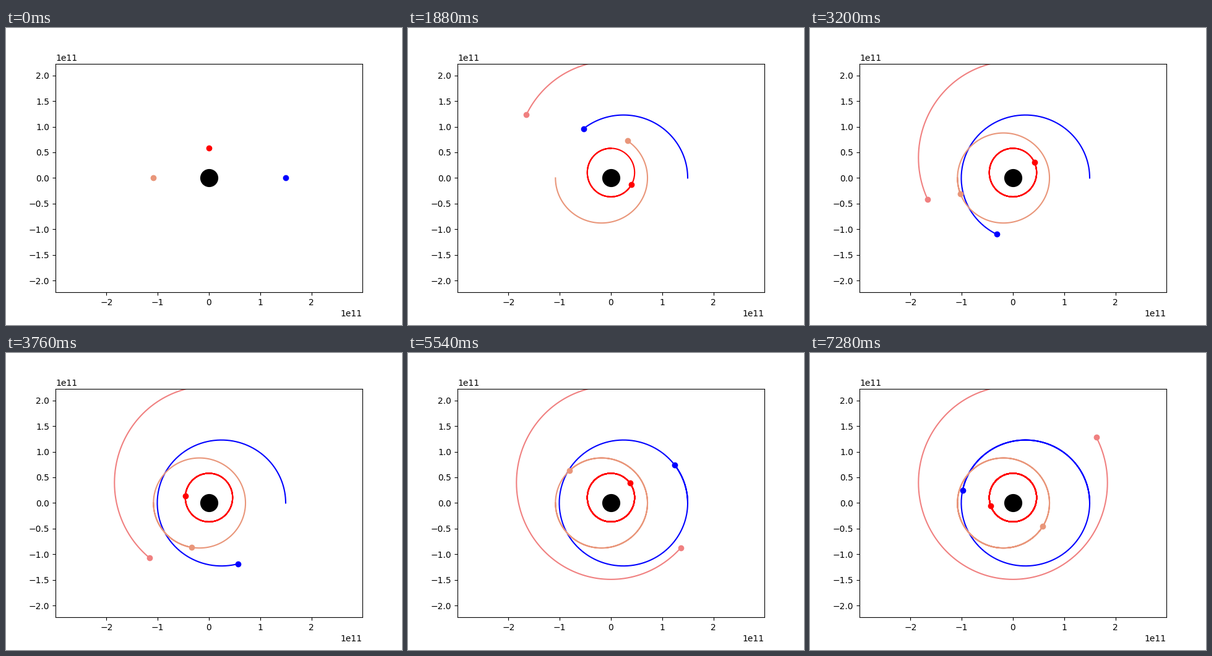
These frames come from a looping animation (640x480 px, 7300 ms). A matplotlib script:

```python
import numpy as np
import matplotlib.pyplot as plt
from matplotlib.animation import FuncAnimation

FRAMES = 365
DAY = 86400.0
GM = 1.7025e20
AU = 149.6e9

# start distance (aphelion), eccentricity, start angle, colour
ORBITS = [
    (AU, 0.195, 0.0, "blue"),
    (57.9e9, 0.223, 90.0, "red"),
    (108.2e9, 0.206, 180.0, "darksalmon"),
    (227.9e9, 0.2095, 90.0, "lightcoral"),
]


def orbit(r, e, start):
    """Daily positions on a Kepler ellipse, starting at aphelion."""
    a = r / (1 + e)
    mean = np.pi + np.sqrt(GM / a**3) * DAY * np.arange(FRAMES)
    ecc = mean.copy()
    for _ in range(12):
        ecc -= (ecc - e * np.sin(ecc) - mean) / (1 - e * np.cos(ecc))
    x = a * (np.cos(ecc) - e)
    y = a * np.sqrt(1 - e * e) * np.sin(ecc)
    t = np.radians(start + 180)
    return x * np.cos(t) - y * np.sin(t), x * np.sin(t) + y * np.cos(t)


fig, ax = plt.subplots(figsize=(6.4, 4.8), dpi=100)
ax.set_aspect("equal", adjustable="datalim")
ax.set_xlim(-2 * AU, 2 * AU)
half_height = 2 * AU * (0.77 * 480) / (0.775 * 640)
ax.set_ylim(-half_height, half_height)

ax.plot([0], [0], "o", color="black", markersize=20)
paths = [orbit(r, e, start) for r, e, start, _ in ORBITS]
trails = [ax.plot([], [], color=c)[0] for *_, c in ORBITS]
dots = [ax.plot([], [], "o", color=c)[0] for *_, c in ORBITS]


def update(i):
    for (x, y), trail, dot in zip(paths, trails, dots):
        trail.set_data(x[:i + 1], y[:i + 1])
        dot.set_data([x[i]], [y[i]])
    return trails + dots


anim = FuncAnimation(fig, update, frames=FRAMES, interval=20,
                     repeat=True, repeat_delay=0)
plt.show()
```
